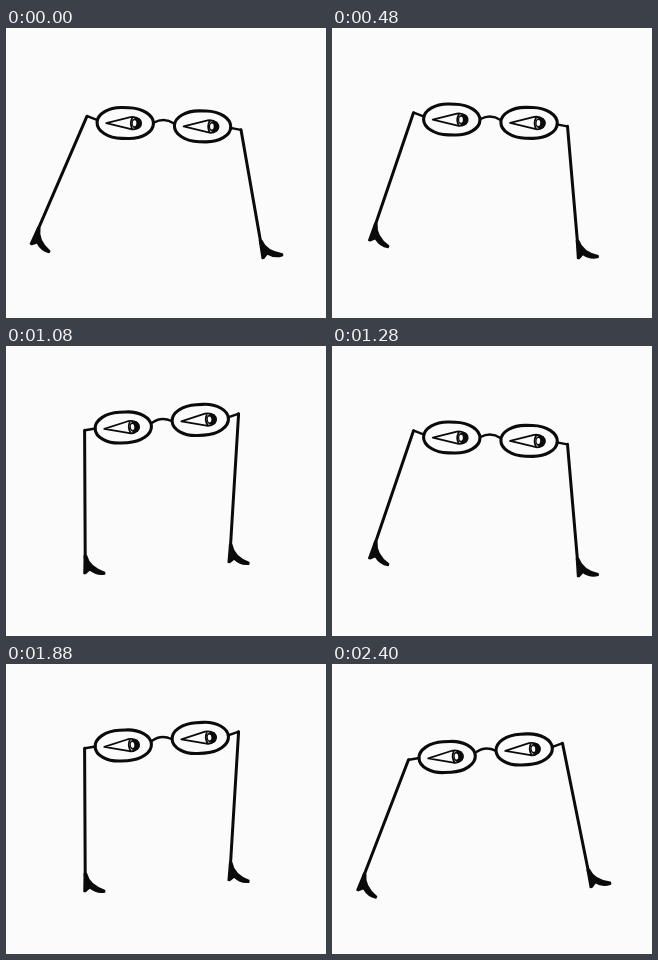
Recreate the animation shown at these times as an HTML page with a canvas. Size 320 by 290 pixels, loop 2.44 s.

```html
<!DOCTYPE html>
<html lang="en">
<head>
<meta charset="utf-8">
<title>Walking glasses</title>
<style>
  html, body { margin: 0; overflow: hidden; background: #fbfbfb; }
  canvas { display: block; }
</style>
</head>
<body>
<canvas id="stage" width="320" height="290"></canvas>
<script>
const ctx = document.getElementById('stage').getContext('2d');
const LOOP = 2440, STEP = 40, CYCLE = 10, HALF = CYCLE / 2;
const INK = '#0b0b0b', PAPER = '#fbfbfb';

// Ankles swing around homeX; peak is the step at which the legs are furthest apart
const leftLeg = { homeX: 61, reach: -31, peak: 9.5, ground: 212.5 };
const rightLeg = { homeX: 235, reach: 22, peak: 9.3, ground: 215.5 };

const foot = new Path2D(
  'M-1-3 L1-3 C3 4 9 10 20 13 L20 14.5 C14 16 9 14 5 11 L1 15 L-.5 15 Z');
const eye = new Path2D(
  'M5-6 L-19 .5 L6 6 M5-6 Q10-7 14-4 M6 6 Q10 7 14 4 M7-5.5 Q4 0 7 5.5');

function stroke(width, path) {
  ctx.lineWidth = width;
  path ? ctx.stroke(path) : ctx.stroke();
}

function placed(x, y, angle, draw) {
  ctx.save();
  ctx.translate(x, y);
  ctx.rotate(angle);
  draw();
  ctx.restore();
}

function dot(x, y, rx, ry, color) {
  ctx.fillStyle = color;
  ctx.beginPath();
  ctx.ellipse(x, y, rx, ry, 0, 0, 7);
  ctx.fill();
}

// The body leans to the supporting side, rising on one leg and sinking on the other
function bodyAt(step) {
  const s = step % HALF;
  return step < HALF
    ? { x: 158 + s / 2, y: 95 - 3.5 * s, tilt: 0.043, skew: 3.5 }
    : { x: 156.3 - 0.7 * s, y: 76 + 1.28 * (s - 1) ** 2, tilt: -0.098, skew: -0.7 };
}

function ankleAt(leg, step, swinging) {
  const lift = swinging ? 15 * Math.sin(Math.PI * (step % HALF + 1.5) / 6.5) : 0;
  return {
    x: leg.homeX + leg.reach * Math.cos((step - leg.peak) / CYCLE * 2 * Math.PI),
    y: leg.ground - lift
  };
}

function drawLens() {
  ctx.beginPath();
  ctx.roundRect(-28.2, -15.4, 56.4, 30.8, { x: 25, y: 15.4 });
  stroke(3.1);
  stroke(1.8, eye);
  dot(11.5, 0, 5.3, 5.7, INK);
  dot(9.3, 0, 1.8, 3, PAPER);
}

function drawLeg(hip, ankle) {
  ctx.beginPath();
  ctx.moveTo(hip.x, hip.y);
  ctx.lineTo(ankle.x, ankle.y);
  stroke(3);
  const lean = Math.atan2(hip.x - ankle.x, ankle.y - hip.y);
  placed(ankle.x, ankle.y, lean + 0.05, () => {
    ctx.fillStyle = INK;
    ctx.fill(foot);
    stroke(1.6, foot);
  });
}

function draw(step) {
  const { x, y, tilt, skew } = bodyAt(step);
  const hip = side => ({
    x: x + side * 77,
    y: y + side * (77 * Math.sin(tilt) + skew)
  });

  ctx.fillStyle = PAPER;
  ctx.fillRect(0, 0, 320, 290);
  ctx.strokeStyle = INK;
  ctx.lineCap = ctx.lineJoin = 'round';

  drawLeg(hip(-1), ankleAt(leftLeg, step, step < HALF));
  drawLeg(hip(1), ankleAt(rightLeg, step, step >= HALF));

  placed(x, y, tilt, () => {
    // Temples and bridge
    ctx.beginPath();
    ctx.moveTo(-77, -skew);
    ctx.lineTo(-66.5, 0);
    ctx.moveTo(77, skew);
    ctx.lineTo(66.5, 2);
    ctx.moveTo(-10, 0);
    ctx.quadraticCurveTo(0, -6, 10, 0);
    stroke(2.4);
    for (const side of [-1, 1]) placed(side * 38.7, 1.7, -tilt / 2, drawLens);
  });
}

function tick() {
  const t = performance.now() % LOOP;
  // The first pose is held for two steps
  draw(Math.max(0, Math.floor(t / STEP) - 1) % CYCLE);
  requestAnimationFrame(tick);
}
tick();
</script>
</body>
</html>
```
